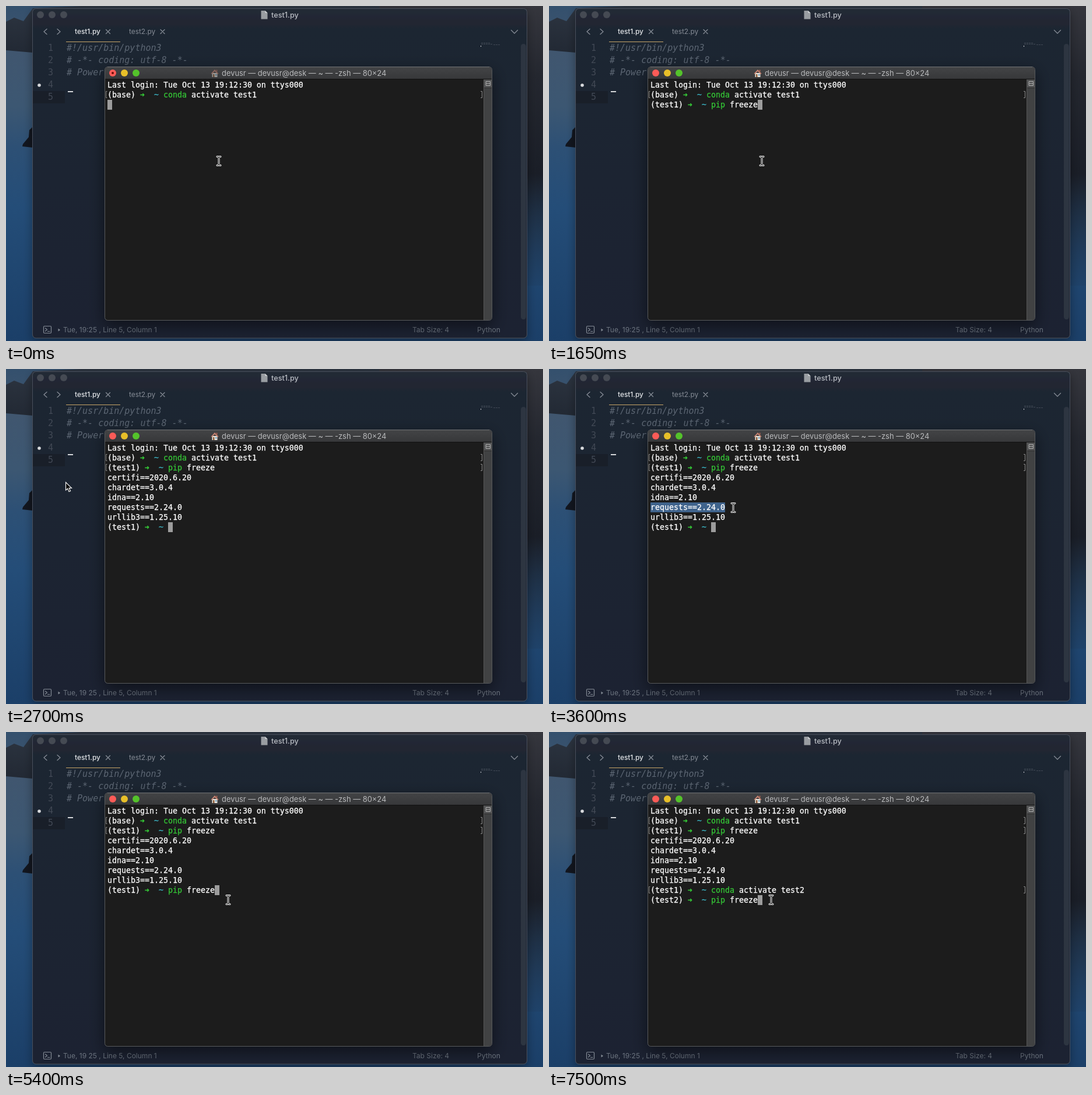
Recreate the animation shown at these times as an HTML page. Size 921 by 575 pixels, loop 8 s.

```html
<!DOCTYPE html>
<html lang="en">
<head>
<meta charset="utf-8">
<title>Terminal session</title>
<style>
  html, body { margin: 0; width: 100%; height: 100%; overflow: hidden; background: #1d2839; }
  svg { display: block; width: 921px; height: 575px; }
  text { white-space: pre; }
  .ui { font-family: Inter, Roboto, sans-serif; }
  .mono { font-family: "DejaVu Sans Mono", "Liberation Mono", monospace; }
  .code { font-size: 15px; font-style: italic; fill: #5c6673; }
  .num { font-size: 15px; fill: #424955; text-anchor: end; }
  .status { font-size: 12px; fill: #6d7580; }
  #screen { font-size: 13.29px; }
  .line { fill: none; stroke-linecap: round; stroke-linejoin: round; }
</style>
</head>
<body>
<svg viewBox="0 0 921 575">
  <defs>
    <linearGradient id="sea" x2="0" y2="1">
      <stop offset="0" stop-color="#34506d"/><stop offset=".14" stop-color="#40566f"/>
      <stop offset=".3" stop-color="#3c5772"/><stop offset=".42" stop-color="#2d5075"/>
      <stop offset=".6" stop-color="#244d78"/><stop offset="1" stop-color="#1b3f68"/>
    </linearGradient>
    <linearGradient id="hill" x2="0" y2="1">
      <stop offset="0" stop-color="#2d3541"/><stop offset="1" stop-color="#222934"/>
    </linearGradient>
    <linearGradient id="cliff" x2="0" y2="1">
      <stop offset="0" stop-color="#35363d"/><stop offset=".25" stop-color="#24272f"/>
      <stop offset=".6" stop-color="#1a1e27"/><stop offset="1" stop-color="#1e2938" stop-opacity=".1"/>
    </linearGradient>
    <linearGradient id="bar" x2="0" y2="1">
      <stop offset="0" stop-color="#434446"/><stop offset="1" stop-color="#363739"/>
    </linearGradient>
    <linearGradient id="editor" x2="0" y2="1">
      <stop offset="0" stop-color="#242a36"/><stop offset=".06" stop-color="#1f2531"/>
      <stop offset="1" stop-color="#1d2430"/>
    </linearGradient>
    <filter id="backShadow" x="-10%" y="-10%" width="120%" height="125%">
      <feDropShadow dx="0" dy="5" stdDeviation="8" flood-color="#000" flood-opacity=".35"/>
    </filter>
    <filter id="shadow" x="-10%" y="-10%" width="120%" height="125%">
      <feDropShadow dx="0" dy="9" stdDeviation="14" flood-color="#000" flood-opacity=".5"/>
    </filter>
    <clipPath id="frame"><rect x="46" y="5" width="847" height="565" rx="6"/></clipPath>
    <path id="beamShape" d="M-3-7.500H-2Q0-7.500 0-5.500V5.500Q0 7.500-2 7.500H-3M3-7.500H2Q0-7.500 0-5.500M3 7.500H2Q0 7.500 0 5.500"/>
  </defs>

  <!-- wallpaper -->
  <rect width="921" height="575" fill="url(#sea)"/>
  <path d="M0 27L14 20 30 26 46 4 130 0H921V6H46V80L0 76Z" fill="url(#hill)"/>
  <path d="M46 207L40 213 39 225 29 237 28 241 46 243Z" fill="#12161f"/>
  <path d="M640 0H921V480H893V6H640Z" fill="url(#cliff)"/>

  <!-- editor window -->
  <g filter="url(#backShadow)">
    <rect x="45.500" y="4.500" width="848" height="565.500" rx="6" fill="url(#editor)" stroke="#4a505b"/>
  </g>
  <g fill="#454a53"><circle cx="59" cy="15" r="6"/><circle cx="79" cy="15" r="6"/><circle cx="99" cy="15" r="6"/></g>
  <path d="M437.500 8H444.500L448.500 12V22.500H437.500Z" fill="#999da2"/>
  <path d="M444.500 8V12H448.500Z" fill="#d0d2d5"/>
  <text class="ui" x="455" y="20" font-size="12.700" font-weight="500" fill="#b9bdc3">test1.py</text>
  <path class="line" stroke="#858b95" stroke-width="1.300" d="M70 39.500L65 44 70 48.500M88 39.500L93 44 88 48.500M866.500 41.500L872 47 877.500 41.500M171.500 40.500L178.500 47.500M178.500 40.500L171.500 47.500M265 40.500L272 47.500M272 40.500L265 47.500"/>
  <text class="ui" x="118" y="48" font-size="11.900" font-weight="500" fill="#e4e6e9">test1.py</text>
  <text class="ui" x="211" y="48" font-size="11.900" fill="#858b95">test2.py</text>
  <rect x="103" y="61" width="93" height="1" fill="#c9a668"/>
  <g clip-path="url(#frame)">
    <rect x="46" y="146" width="55" height="21" fill="#191f29"/>
    <rect x="883" y="65" width="9" height="473" rx="4.500" fill="#2d3541"/>
  </g>
  <g id="gutter" class="mono num"></g>
  <g class="mono code">
    <text x="104" y="77">#!/usr/bin/python3</text>
    <text x="104" y="98"># -*- coding: utf-8 -*-</text>
    <text x="104" y="119"># Power</text>
  </g>
  <circle cx="57" cy="136" r="2.800" fill="#d8dadd"/>
  <rect x="106" y="146" width="9" height="2" fill="#d5d7da"/>
  <path d="M815 63.500H830M815 65.500H834M836 66.500H847" stroke="#414955" stroke-dasharray="3 1"/>
  <rect x="814" y="68" width="1" height="2" fill="#cfd2d6"/>
  <g class="line" stroke="#848b95" stroke-width="1.200">
    <rect x="64.500" y="549.500" width="13" height="12" rx="1.500"/>
    <path d="M67.500 553L70.500 555.500 67.500 558M71.500 558.500H75"/>
  </g>
  <path d="M89.500 553.500L93 556 89.500 558.500Z" fill="#848b95"/>
  <g class="ui status">
    <text id="clock" x="98" y="560"></text>
    <text x="697" y="560">Tab Size: 4</text>
    <text x="808" y="560">Python</text>
  </g>

  <!-- terminal window -->
  <g filter="url(#shadow)">
    <rect x="169.500" y="104.500" width="664" height="435" rx="5" fill="#1e1e1e" stroke="#585a5c"/>
  </g>
  <path d="M170 126V110Q170 105 175 105H828Q833 105 833 110V126Z" fill="url(#bar)"/>
  <rect x="170" y="125" width="663" height="1" fill="#111"/>
  <path d="M174 104.500H829" stroke="#717375"/>
  <circle cx="183" cy="115" r="6" fill="#fc5b57"/>
  <circle id="busyDot" cx="183" cy="115" r="2" fill="#6d0d0a"/>
  <circle cx="203" cy="115" r="6" fill="#e8bf29"/>
  <circle cx="223" cy="115" r="6" fill="#54c22b"/>
  <g id="house">
    <path d="M353.500 115H362.500V122H353.500Z" fill="#e9e4da"/>
    <path d="M351.500 116L358 109 364.500 116 363 117 358 112 353 117Z" fill="#c78372"/>
    <path d="M360.500 109.500H362.500V113.500L360.500 111.500Z" fill="#a8604e"/>
    <path d="M355 117H357.500V122H355Z" fill="#8a5a38"/>
    <path d="M359 117H361.500V119.500H359Z" fill="#6c9cc0"/>
  </g>
  <text class="ui" x="370" y="120" font-size="12.900" fill="#b9babc">devusr — devusr@desk — ~ — -zsh — 80×24</text>
  <path d="M819 126H833V535Q833 539 829 539H819Z" fill="#414243"/>
  <rect x="819" y="126" width="1" height="413" fill="#555"/>
  <rect x="820" y="126" width="13" height="14" fill="#515253"/>
  <rect x="820" y="140" width="13" height="1" fill="#2d2d2d"/>
  <path d="M823.500 129.500H830.500V136.500H823.500ZM823.500 133H830.500" class="line" stroke="#b4b4b4"/>
  <g id="screen" class="mono"></g>

  <!-- pointers -->
  <g id="beam" class="line">
    <use href="#beamShape" stroke="#f4f4f4" stroke-width="3"/>
    <use href="#beamShape" stroke="#111" stroke-width="1"/>
  </g>
  <path id="arrow" d="M.5.5V14L3.700 11.200 6 16.500 8.500 15.400 6.200 10.300H10.500Z" fill="#080808" stroke="#f2f2f2" stroke-width="1.200"/>
</svg>
<script>
const LOOP = 8000, TICK = 150;
const LEFT = 174, TOP = 127, COL = 8, ROW = 17;
const WHITE = '#fff', GREEN = '#35c837', CYAN = '#3dbccb', RED = '#d0402f';
const $ = id => document.getElementById(id);

// Each shell row: environment, [time, input] steps, time of Enter.
const shell = [
  { env: 'base', steps: [[0, 'conda activate test1']], enter: 0 },
  { env: 'test1', enter: 2100, steps: [
    [150, ''], [900, 'p'], [1050, 'pi'], [1200, 'pip'],
    [1350, 'pip f'], [1500, 'pip fre'], [1650, 'pip freeze']] },
  { env: 'test1', enter: 6750, steps: [
    [2550, ''], [5400, 'pip freeze'], [5700, 'conda activate test1'],
    [6300, 'conda activate test'], [6450, 'conda activate test2']] },
  { env: 'test2', enter: Infinity, steps: [
    [6900, ''], [7350, 'conda activate test2'], [7500, 'pip freeze']] }
];
const packages = ['certifi==2020.6.20', 'chardet==3.0.4', 'idna==2.10',
  'requests==2.24.0', 'urllib3==1.25.10'].map(out => ({ out, at: 2400 }));
const rows = [{ out: 'Last login: Tue Oct 13 19:12:30 on ttys000', at: 0 },
  ...shell.slice(0, 2), ...packages, ...shell.slice(2)];
const PICKED_ROW = 6;

const pointer = [
  [0, 365, 266], [2100, 365, 266], [2400, 300, 245], [2550, 150, 210],
  [2700, 102, 194], [2850, 106, 214], [3000, 172, 237], [3150, 176, 237],
  [3600, 316, 238], [3750, 316, 238], [4050, 254, 237], [4200, 300, 233],
  [4350, 389, 310], [4500, 389, 306], [4950, 381, 288], [LOOP, 381, 288]
];

const rect = (x, y, w, h, fill) =>
  `<rect x="${x}" y="${y}" width="${w}" height="${h}" fill="${fill}"/>`;
const word = (col, row, text, fill, extra = '') =>
  `<text x="${LEFT + col * COL}" y="${TOP + row * ROW + 13}" fill="${fill}" stroke="${fill}" stroke-width=".25" ${extra}>${text}</text>`;

function brackets(row) {
  const y = TOP + row * ROW + 2.5;
  return `<path d="M173 ${y}H171.500V${y + 11}H173M814.500 ${y}H816.500V${y + 11}H814.500" class="line" stroke="#8c8c8c"/>`;
}

function commandLine(col, row, input) {
  let html = '';
  input.split(' ').forEach((part, i) => {
    const known = part === 'pip' || part === 'conda';
    const fill = i ? WHITE : known ? GREEN : RED;
    html += word(col, row, part, fill);
    if (i && part === 'test')
      html += rect(LEFT + col * COL, TOP + row * ROW + 15, part.length * COL, 1, WHITE);
    col += part.length + 1;
  });
  return html;
}

function pointerAt(t) {
  const i = pointer.findIndex(key => key[0] > t);
  const [t0, x0, y0] = pointer[i - 1], [t1, x1, y1] = pointer[i];
  const k = (t - t0) / (t1 - t0);
  return [Math.round(x0 + (x1 - x0) * k), Math.round(y0 + (y1 - y0) * k)];
}

function selectedColumns(t, x) {
  if (t < 3150 || t >= 4800) return 0;
  return t > 4050 ? 10 : Math.min(16, Math.max(0, Math.round((x - LEFT) / COL)));
}

function drawScreen(t, x) {
  const picked = selectedColumns(t, x);
  let html = picked ? rect(LEFT, TOP + PICKED_ROW * ROW, picked * COL, ROW, '#3f638c') : '';
  let row = 0, cursorCol = 0, cursorRow = 0, busy = false;
  for (const item of rows) {
    if (t < (item.out ? item.at : item.steps[0][0])) break;
    if (item.out) {
      html += word(0, row, item.out, WHITE);
    } else {
      const input = item.steps.filter(step => step[0] <= t).pop()[1];
      const arrowCol = item.env.length + 3, start = arrowCol + 5;
      html += word(0, row, `(${item.env})`, WHITE)
        + word(arrowCol, row, '➜', GREEN, 'font-weight="bold"')
        + word(arrowCol + 3, row, '~', CYAN)
        + commandLine(start, row, input);
      busy = t >= item.enter;
      if (busy) html += brackets(row);
      cursorCol = start + input.length;
      cursorRow = row;
    }
    row++;
  }
  if (busy) [cursorCol, cursorRow] = [0, row];
  html += rect(LEFT + cursorCol * COL, TOP + cursorRow * ROW, COL, ROW, '#9c9c9c');
  $('screen').innerHTML = html;
  $('busyDot').style.opacity = busy ? 1 : 0;
  $('house').style.opacity = busy ? .55 : 1;
}

function draw(t) {
  const [x, y] = pointerAt(t);
  const inside = x >= 169;
  drawScreen(t, x);
  $('beam').style.display = inside ? '' : 'none';
  $('arrow').style.display = inside ? 'none' : '';
  $(inside ? 'beam' : 'arrow').setAttribute('transform', `translate(${x} ${y})`);
  const colon = Math.floor((t + 500) / 1000) % 2 ? '\u00a0' : ':';
  $('clock').textContent = `Tue, 19${colon}25 , Line 5, Column 1`;
}

$('gutter').innerHTML = [1, 2, 3, 4, 5]
  .map(n => `<text x="81" y="${56 + n * 21}">${n}</text>`).join('');

let shown = -1;
const began = performance.now();
function loop() {
  const tick = Math.floor((performance.now() - began) % LOOP / TICK);
  if (tick !== shown) draw((shown = tick) * TICK);
  requestAnimationFrame(loop);
}
loop();
</script>
</body>
</html>
```
